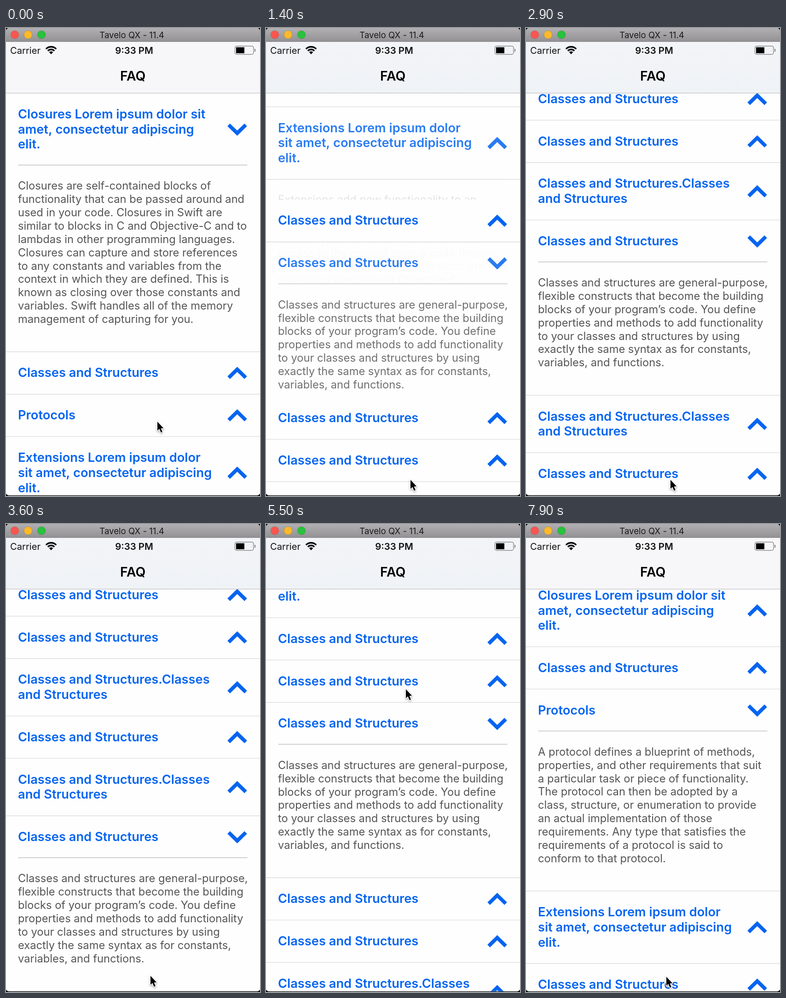
An HTML page with a canvas for the animation above (8000 ms loop, 552x1014 px).

```html
<!DOCTYPE html>
<html lang="en">
<head>
<meta charset="utf-8">
<title>FAQ accordion</title>
<style>
html, body { margin: 0; width: 100%; height: 100%; overflow: hidden; background: #000; }
canvas { display: block; }
</style>
</head>
<body>
<canvas id="stage" width="552" height="1014"></canvas>
<script>
const ctx = document.getElementById("stage").getContext("2d");
const W = 552, H = 1014, LOOP = 8000, TICK = 100, SLIDE = 300;
const LIST_TOP = 141.1, LIST_BOTTOM = 1012;
const BLUE = "#0464f0", GREY = "#555", PAPER = "#fefefe", RULE = "#c8c7cc";
const font = (size, weight = 400) => `${weight} ${size}px Inter, "Liberation Sans", sans-serif`;
const TITLE_FONT = font(27.25, 600), BODY_FONT = font(23.7);

const classesBody = [
  "Classes and structures are general-purpose,", "flexible constructs that become the building",
  "blocks of your program’s code. You define", "properties and methods to add functionality",
  "to your classes and structures by using", "exactly the same syntax as for constants,",
  "variables, and functions."];
const closures = {
  title: ["Closures Lorem ipsum dolor sit", "amet, consectetur adipiscing", "elit."],
  body: [
    "Closures are self-contained blocks of", "functionality that can be passed around and",
    "used in your code. Closures in Swift are", "similar to blocks in C and Objective-C and to",
    "lambdas in other programming languages.", "Closures can capture and store references",
    "to any constants and variables from the", "context in which they are defined. This is",
    "known as closing over those constants and", "variables. Swift handles all of the memory",
    "management of capturing for you."]
};
const protocols = {
  title: ["Protocols"],
  body: [
    "A protocol defines a blueprint of methods,", "properties, and other requirements that suit",
    "a particular task or piece of functionality.", "The protocol can then be adopted by a",
    "class, structure, or enumeration to provide", "an actual implementation of those",
    "requirements. Any type that satisfies the", "requirements of a protocol is said to",
    "conform to that protocol."]
};
const extensions = {
  title: ["Extensions Lorem ipsum dolor", "sit amet, consectetur adipiscing", "elit."],
  body: [
    "Extensions add new functionality to an", "existing class, structure, enumeration, or",
    "protocol type. This includes the ability to", "extend types for which you do not have",
    "access to the original source code (known", "as retroactive modeling). Extensions are",
    "similar to categories in Objective-C."]
};
const single = { title: ["Classes and Structures"], body: classesBody };
const double = { title: ["Classes and Structures.Classes", "and Structures"], body: classesBody };
const rows = [closures, single, protocols, extensions, single, single, single, single, single,
  double, single, double, single];

const headHeight = row => 59.2 + 32.6 * row.title.length;
const bodyHeight = row => 85.6 + 28.9 * row.body.length;
const clamp = (v, lo, hi) => Math.min(hi, Math.max(lo, v));
const lerp = (a, b, p) => a + (b - a) * p;
const smooth = p => { p = clamp(p, 0, 1); return p * p * (3 - 2 * p); };

// Taps: time and the row left open (-1 for none).
const taps = [[-1000, 0], [560, 3], [1174, 5], [1790, 8], [2400, 10], [3020, 12], [3640, -1],
  [4900, 6], [6000, 4], [6765, 2]];
const states = [];
for (const [time, open] of taps) states.push(layout(time, open, states.at(-1)));

// The open row is centred in the list as far as the scroll range allows.
function layout(time, open, previous) {
  let y = LIST_TOP;
  const tops = [];
  rows.forEach((row, i) => {
    tops.push(y);
    y += headHeight(row) + (i === open ? bodyHeight(row) : 0);
  });
  let scroll = previous ? previous.scroll : 0;
  if (open >= 0) {
    const cell = headHeight(rows[open]) + bodyHeight(rows[open]);
    scroll = tops[open] + cell / 2 - (LIST_TOP + LIST_BOTTOM) / 2;
  }
  scroll = clamp(scroll, 0, y - LIST_BOTTOM);
  return { time, open, scroll, tops: tops.map(top => top - scroll) };
}

// Pointer path: time, x, y.
const pointerPath = [[0, 329, 853], [480, 314, 979], [4300, 314, 979], [4800, 304, 358],
  [5500, 304, 358], [5900, 294, 205], [7050, 294, 205], [7700, 305, 981], [8000, 305, 981]];

function pointerAt(t) {
  const i = pointerPath.findIndex(p => p[0] > t);
  const a = pointerPath[i - 1], b = pointerPath[i];
  const p = smooth((t - a[0]) / (b[0] - a[0]));
  return [lerp(a[1], b[1], p), lerp(a[2], b[2], p)];
}

function box(x, y, w, h, color) {
  ctx.fillStyle = color;
  ctx.fillRect(x, y, w, h);
}

function label(text, x, y, style, color, align = "left") {
  ctx.font = style;
  ctx.fillStyle = color;
  ctx.textAlign = align;
  ctx.fillText(text, x, y);
}

function chevron(y, direction) {
  ctx.strokeStyle = BLUE;
  ctx.lineWidth = 8;
  ctx.beginPath();
  ctx.moveTo(484, y - 10 * direction);
  ctx.lineTo(502.5, y + 8 * direction);
  ctx.lineTo(521, y - 10 * direction);
  ctx.stroke();
}

function drawCell(row, y, open, alpha) {
  const head = headHeight(row);
  const height = head + (open ? bodyHeight(row) : 0);
  if (y > LIST_BOTTOM || y + height < 100) return;
  ctx.globalAlpha = alpha;
  box(0, y + 0.5, W, height, PAPER);
  row.title.forEach((line, i) => label(line, 26, y + 54.7 + 32.8 * i, TITLE_FONT, BLUE));
  chevron(y + head / 2 + 0.2, open ? 1 : -1);
  if (open) {
    box(26.5, y + head - 2, 498, 1.7, RULE);
    row.body.forEach((line, i) => label(line, 26, y + head + 52.3 + 28.85 * i, BODY_FONT, GREY));
  }
  box(0, y + height - 0.5, W, 1, RULE);
  ctx.globalAlpha = 1;
}

function drawList(from, to, p) {
  rows.forEach((row, i) => {
    const y = lerp(from.tops[i], to.tops[i], p);
    const before = from.open === i, after = to.open === i;
    if (before === after || p === 1) return drawCell(row, y, after, 1);
    drawCell(row, y, before, 1 - p);
    drawCell(row, y, after, p);
  });
}

function drawWifi() {
  ctx.strokeStyle = ctx.fillStyle = "#000";
  ctx.lineWidth = 3.4;
  for (const radius of [15.8, 10]) {
    ctx.beginPath();
    ctx.arc(98, 56.5, radius, -Math.PI * 0.75, -Math.PI * 0.25);
    ctx.stroke();
  }
  ctx.beginPath();
  ctx.moveTo(98, 57);
  ctx.arc(98, 56.5, 6, -Math.PI * 0.75, -Math.PI * 0.25);
  ctx.fill();
}

function drawBattery() {
  ctx.strokeStyle = "#8c8c8e";
  ctx.lineWidth = 1.5;
  ctx.beginPath();
  ctx.roundRect(497.5, 39.2, 40.5, 18, 4);
  ctx.stroke();
  box(500, 41.7, 18, 13, "#000");
  ctx.fillStyle = "#8c8c8e";
  ctx.beginPath();
  ctx.roundRect(540, 45, 2.2, 6.5, 1);
  ctx.fill();
}

function drawNavigation(scroll) {
  box(0, 30, W, 111, "#f7f6f8");
  const tint = ctx.createLinearGradient(0, 30, 0, 141);
  tint.addColorStop(0, "rgba(0,140,200,.018)");
  tint.addColorStop(1, "rgba(0,140,200,.03)");
  ctx.globalAlpha = clamp((scroll - 35) / 100, 0, 1);
  box(0, 30, W, 111, tint);
  ctx.globalAlpha = 1;
  box(0, 140.6, W, 1, "#b4b3b6");
  label("Carrier", 9, 55.5, font(20.2), "#111");
  label("9:33 PM", 278.5, 55.5, font(20.4, 600), "#111", "center");
  label("FAQ", 275.7, 113.7, font(28.3, 600), "#000", "center");
  drawWifi();
  drawBattery();
}

function drawTitleBar() {
  const shade = ctx.createLinearGradient(0, 0, 0, 30);
  shade.addColorStop(0, "#b2b0b2");
  shade.addColorStop(1, "#929092");
  box(0, 0, W, 30, shade);
  box(0, 29, W, 1, "#858385");
  const lights = ["#fc5550", "#fdb928", "#28c23e"];
  lights.forEach((color, i) => {
    ctx.beginPath();
    ctx.arc(19 + 29 * i, 14.5, 8.8, 0, Math.PI * 2);
    ctx.fillStyle = color;
    ctx.fill();
    ctx.strokeStyle = "rgba(0,0,0,.15)";
    ctx.lineWidth = 1;
    ctx.stroke();
  });
  label("Tavelo QX - 11.4", 273.5, 21.7, font(18.6), "#1c1a1c", "center");
}

function drawPointer(x, y) {
  ctx.save();
  ctx.translate(x, y);
  ctx.beginPath();
  ctx.moveTo(0, 0);
  for (const [px, py] of [[0, 19.5], [4.3, 15.6], [7.8, 23.6], [11, 22.2], [7.6, 14.4], [13.2, 13.9]])
    ctx.lineTo(px, py);
  ctx.closePath();
  ctx.shadowColor = "rgba(0,0,0,.35)";
  ctx.shadowBlur = 4;
  ctx.shadowOffsetY = 2;
  ctx.strokeStyle = "#fff";
  ctx.lineWidth = 2.6;
  ctx.lineJoin = "round";
  ctx.stroke();
  ctx.shadowColor = "transparent";
  ctx.fillStyle = "#000";
  ctx.fill();
  ctx.restore();
}

function draw(t) {
  const current = states.findLastIndex(state => state.time <= t);
  const to = states[current], from = states[Math.max(0, current - 1)];
  const p = smooth((t - to.time) / SLIDE);
  box(0, 0, W, H, "#000");
  ctx.save();
  ctx.beginPath();
  ctx.roundRect(0, 0, W, LIST_BOTTOM + 0.5, [7, 7, 6, 6]);
  ctx.clip();
  box(0, 0, W, H, PAPER);
  drawList(from, to, p);
  drawNavigation(lerp(from.scroll, to.scroll, p));
  drawTitleBar();
  ctx.restore();
  drawPointer(...pointerAt(t));
}

const start = performance.now();
function frame() {
  const t = (performance.now() - start) % LOOP;
  draw(Math.floor(t / TICK) * TICK);
  requestAnimationFrame(frame);
}
frame();
</script>
</body>
</html>
```
